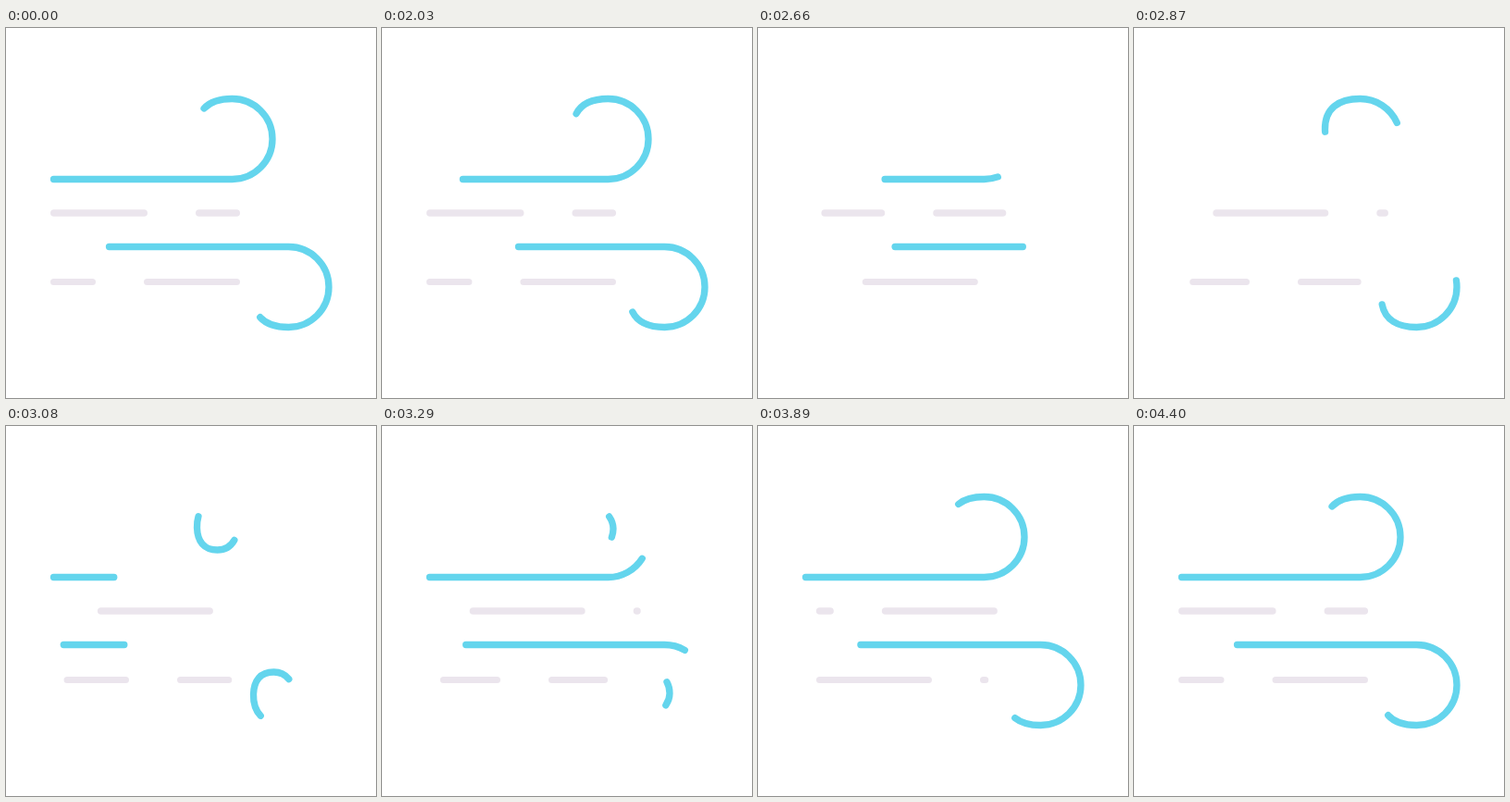
Recreate the animation shown at these times as an HTML page. Size 400x400 px, loop 4.43 s.

```html
<!DOCTYPE html>
<html>
<head>
<meta charset="utf-8">
<title>Wind</title>
<style>
  html, body { margin: 0; width: 100%; height: 100%; overflow: hidden; background: #fff; }
  svg { display: block; width: 100%; height: 100%; }
  path { fill: none; stroke-linecap: round; }
</style>
</head>
<body>
<svg viewBox="0 0 400 400">
  <g id="breeze" stroke="#ebe5ed"></g>
  <g id="upper" stroke="#64d5ed" stroke-width="7.3"></g>
  <g id="lower" stroke="#64d5ed" stroke-width="7.3" transform="translate(61 400) scale(1 -1)"></g>
</svg>
<script>
const LOOP = 4430, HOLD = 2000, STEP = 30, STEPS = 81;
const PERIOD = 177, DASH = 125;

const addPath = (id, attrs = {}) => {
  const path = document.createElementNS('http://www.w3.org/2000/svg', 'path');
  for (const key in attrs) path.setAttribute(key, attrs[key]);
  return document.getElementById(id).appendChild(path);
};

// Smooth monotone curve through [x, y] points, flat at both ends.
function curve(...points) {
  const secant = i => (points[i + 1][1] - points[i][1]) / (points[i + 1][0] - points[i][0]);
  const slopes = points.map((_, i) => {
    if (!i || i === points.length - 1) return 0;
    const a = secant(i - 1), b = secant(i);
    return a * b > 0 ? 2 * a * b / (a + b) : 0;
  });
  return x => {
    if (x <= points[0][0]) return points[0][1];
    const i = points.findIndex(p => p[0] >= x) - 1;
    if (i < 0) return points[points.length - 1][1];
    const [x0, y0] = points[i], [x1, y1] = points[i + 1];
    const w = x1 - x0, u = (x - x0) / w, v = 1 - u;
    return y0 * v * v * (1 + 2 * u) + y1 * u * u * (3 - 2 * u)
      + w * u * v * (slopes[i] * v - slopes[i + 1] * u);
  };
}

const passHead = curve([14, 0], [15, .021], [29, .82], [43, .996], [46, 1]);
const passTail = curve([17, 0], [29, .588], [43, .947], [46, 1]);
const settle = curve([30.5, 0], [36, .18], [43, .653], [54, .897], [63, .99], [71, 1]);
const drift = curve([0, 0], [15, 63], [29, 205], [36, 213], [43, 208], [63, 91], [81, 0]);

function makeGust(id, startX, restTail, restHead) {
  const d = `M${startX} 163.5H244.5A43.5 43.5 0 0 0 244.5 76.5`
    + 'C221 76.5 206 87 206.5 110C207 125 214 134 228.5 134'
    + 'C241 134 250 124 250 111C250 106 248 101 245 97';
  const strokes = [0, 1, 2].map(() => addPath(id, { d }));
  const length = strokes[0].getTotalLength();

  return n => {
    const x = Math.min(n / 16, 1);
    const leave = x + .224 * x * (1 - x);
    const spans = [
      [restTail + (length - restTail) * leave, restHead + (length - restHead) * x],
      [length * passTail(n), length * passHead(n)],
      [restTail * settle(n), restHead * settle(n)]
    ];
    spans.forEach(([tail, head], i) => {
      const size = head - tail;
      strokes[i].style.display = size > .5 ? '' : 'none';
      strokes[i].setAttribute('stroke-dasharray', `${Math.max(size, 0)} 9999`);
      strokes[i].setAttribute('stroke-dashoffset', -tail);
    });
  };
}

function makeBreeze(y, width, base, leftShift, rightShift, follow) {
  const path = addPath('breeze', { 'stroke-width': width });
  const cap = width / 2;

  return n => {
    const swell = Math.sin(Math.PI * n / STEPS) ** 2;
    const left = 48 + leftShift * swell, right = 253 + rightShift * swell;
    const first = (base + drift(n) + follow * swell) % PERIOD - PERIOD;
    let d = '';
    for (let k = 0; k < 3; k++) {
      const start = first + k * PERIOD;
      const a = Math.max(left, start) + cap;
      const b = Math.min(right, start + DASH) - cap;
      if (b > a) d += `M${a} ${y}H${b}`;
    }
    path.setAttribute('d', d);
  };
}

const parts = [
  makeBreeze(200, 7.6, 28, 36, 27, 36),
  makeBreeze(274.5, 7.2, 149, 15, -9, 0),
  makeGust('upper', 51.5, 0, 362.5),
  makeGust('lower', -9.5, 60, 424)
];

function draw() {
  const time = performance.now() % LOOP;
  const n = Math.max(0, Math.floor((time - HOLD) / STEP));
  parts.forEach(part => part(n));
  requestAnimationFrame(draw);
}
draw();
</script>
</body>
</html>
```
